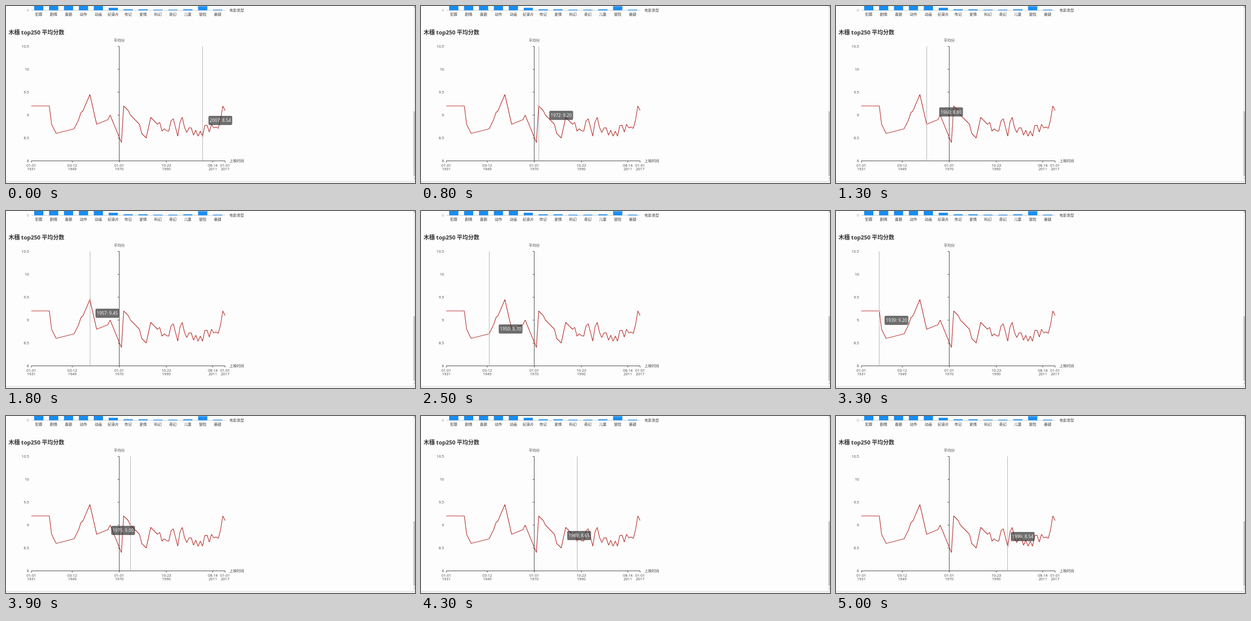
Write an HTML page with a canvas that moves like this. It is 800x348 px and loops after 5100 ms.

```html
<!DOCTYPE html>
<html lang="zh">
<head>
<meta charset="utf-8">
<style>
  html, body { margin: 0; width: 100%; height: 100%; overflow: hidden; background: #fefdfe; }
  canvas { display: block; }
</style>
</head>
<body>
<canvas id="stage" width="800" height="348"></canvas>
<script>
const ctx = document.getElementById('stage').getContext('2d');
const FONT = '"Open Sans", "Noto Sans CJK SC", "Noto Sans CJK", sans-serif';
const LOOP = 5100, STEP = 100;
const LEFT = 49.5, RIGHT = 428.5, TOP = 79.5, BOTTOM = 304.5, AXIS = 221.5;

// Mean scores, as runs of consecutive years
const runs = {
  1931: [9.2],
  1939: [9.2, 8.8],
  1942: [8.6],
  1950: [8.7],
  1952: [8.9, 9.05, 9.1],
  1957: [9.45],
  1960: [8.8],
  1965: [8.9, 9],
  1971: [8.4, 9.2],
  1974: [9.1, 9],
  1979: [8.8, 8.6],
  1982: [8.5],
  1984: [8.95],
  1987: [8.8, 8.84, 8.65, 8.7, 8.66, 8.65, 8.87, 8.92],
  1996: [8.54, 8.85, 8.95, 8.73, 8.62, 8.72, 8.72, 8.56, 8.67, 8.54, 8.65,
         8.54, 8.77, 8.78, 8.63, 8.8, 8.72, 8.74, 8.71, 8.9, 9.2, 9.1]
};
const points = Object.entries(runs).flatMap(([start, scores]) =>
  scores.map((score, i) => ({ year: +start + i, score })));

// Pointer path: time, year under the pointer, tooltip left, tooltip top
const path = [
  [0, 2007, 396, 216], [200, 2007, 396, 216],
  [800, 1972, 251, 206], [1400, 1960, 192, 198],
  [1800, 1957, 175, 192], [2200, 1957, 175, 192],
  [2500, 1950, 152, 223], [2800, 1940, 109, 214],
  [3300, 1939, 95, 206], [3400, 1939, 95, 206],
  [4000, 1982, 228, 218], [4300, 1989, 286, 226],
  [4600, 1993, 331, 227], [5000, 1996, 342, 228]
];

const bars = [
  ['犯罪', 9], ['剧情', 9], ['喜剧', 9], ['动作', 9], ['动画', 9], ['纪录片', 5],
  ['传记', 2], ['爱情', 2], ['科幻', 1.3], ['奇幻', 1.3], ['儿童', 2], ['冒险', 9], ['悬疑', 1.3]
];
const dates = [
  [49.5, '01-01', 1931], [129.5, '03-12', 1949], [221.5, '01-01', 1970],
  [313.5, '10-23', 1990], [404.5, '08-14', 2011], [428.5, '01-01', 2017]
];

const xOf = year => LEFT + (year - 1931) / 86 * (RIGHT - LEFT);
const yOf = score => BOTTOM - (score - 8) / 2.5 * (BOTTOM - TOP);

function text(str, x, y, { size = 7.3, align = 'center', color = '#444', weight = 400 } = {}) {
  ctx.font = `${weight} ${size}px ${FONT}`;
  ctx.textAlign = align;
  ctx.fillStyle = color;
  ctx.fillText(str, x, y + size * 0.37);
}

function line(x1, y1, x2, y2, color = '#444') {
  ctx.strokeStyle = color;
  ctx.lineWidth = 1;
  ctx.beginPath();
  ctx.moveTo(x1, y1);
  ctx.lineTo(x2, y2);
  ctx.stroke();
}

function rect(x, y, w, h, color) {
  ctx.fillStyle = color;
  ctx.fillRect(x, y, w, h);
}

function drawBars() {
  text('0', 45, 8.5, { align: 'right', color: '#999' });
  line(LEFT, 8.5, RIGHT, 8.5, '#ccc');
  bars.forEach(([name, height], i) => {
    const x = 64.1 + i * 29.15;
    rect(x - 9, 8.5 - height, 18, height, '#188df0');
    if (name === '冒险') rect(x - 9, 0, 18, 2, '#4ba7f4');
    text(name, x, 16.8, { size: 7.2, color: '#333' });
  });
  text('电影类型', 437, 8.5, { size: 7.2, align: 'left' });
}

function drawAxes() {
  text('木穗 top250 平均分数', 5, 52.3, { size: 11, align: 'left', weight: 700, color: '#333' });
  text('平均分', AXIS, 67, { size: 7.2 });
  text('上映时间', 437, 304.3, { size: 7.2, align: 'left' });
  line(LEFT, BOTTOM, RIGHT, BOTTOM);
  line(AXIS, TOP, AXIS, BOTTOM);
  for (let score = 8; score <= 10.5; score += 0.5) {
    const y = yOf(score);
    const tick = Math.floor(y) + 0.5;
    line(AXIS - 3, tick, AXIS, tick);
    text(score, 45, y, { align: 'right' });
  }
  for (const [x, day, year] of dates) {
    line(x, BOTTOM, x, BOTTOM + 3);
    text(day, x, 313);
    text(year, x, 320.5);
  }
}

function drawCurve() {
  ctx.strokeStyle = '#b5322d';
  ctx.lineWidth = 1.2;
  ctx.lineJoin = 'bevel';
  ctx.beginPath();
  for (const p of points) ctx.lineTo(xOf(p.year), yOf(p.score));
  ctx.stroke();
}

function drawScrollbars() {
  rect(797, 0, 3, 345, '#f0eff0');
  rect(797, 207, 3, 127, '#c2c1c2');
  rect(798, 1, 1.5, 1.5, '#777');
  rect(798, 338, 1.5, 1.5, '#999');
  rect(0, 344, 800, 4, '#f3f2f3');
  rect(0, 344, 800, 1, '#dddcdd');
}

function poseAt(t) {
  const next = path.findIndex(key => key[0] > t);
  if (next < 0) return path[path.length - 1];
  const a = path[next - 1], b = path[next];
  const k = (t - a[0]) / (b[0] - a[0]);
  return a.map((v, i) => v + (b[i] - v) * k);
}

function drawPointer(t) {
  const [, year, left, top] = poseAt(t);
  const near = points.reduce((a, b) => Math.abs(b.year - year) < Math.abs(a.year - year) ? b : a);
  const x = xOf(near.year), guide = Math.floor(x) + 0.5;
  line(guide, TOP, guide, BOTTOM, '#b4b3b4');
  drawCurve();

  ctx.beginPath();
  ctx.arc(x, yOf(near.score), 1.5, 0, Math.PI * 2);
  ctx.fillStyle = '#fff';
  ctx.fill();
  ctx.strokeStyle = '#c87874';
  ctx.lineWidth = 0.8;
  ctx.stroke();

  ctx.beginPath();
  ctx.roundRect(left, top, 46.5, 18, 2.4);
  ctx.fillStyle = 'rgba(50,50,50,.7)';
  ctx.fill();
  text(`${near.year}: ${near.score.toFixed(2)}`, left + 23.2, top + 9, { size: 8.6, color: '#fff' });
}

function frame(now) {
  const t = Math.floor(now % LOOP / STEP) * STEP;
  rect(0, 0, 800, 348, '#fefdfe');
  drawBars();
  drawAxes();
  drawPointer(t);
  drawScrollbars();
  requestAnimationFrame(frame);
}
requestAnimationFrame(frame);
</script>
</body>
</html>
```
